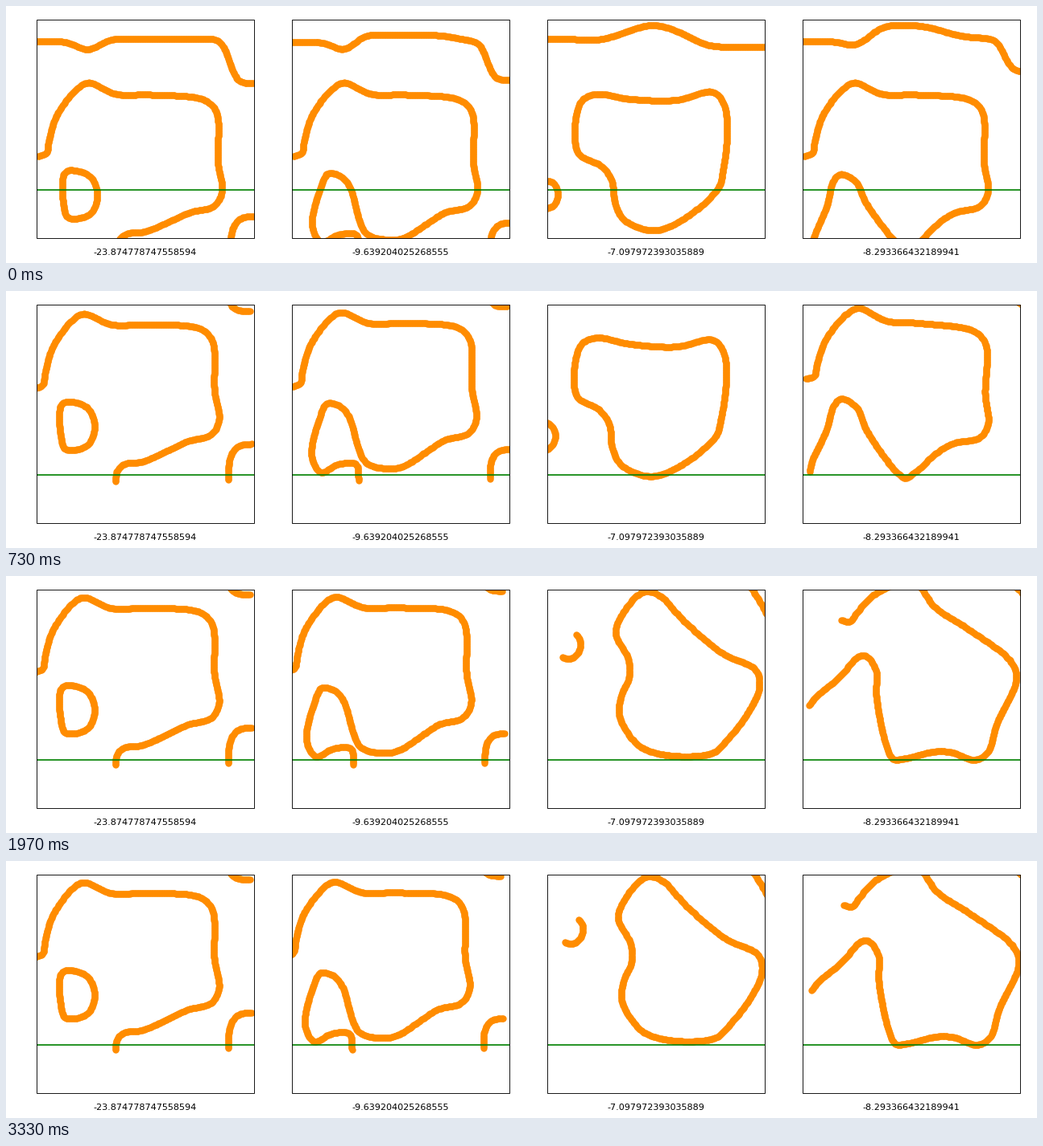
Recreate the animation shown at these times as a matplotlib script. Size 1280 by 320 pixels, loop 3.36 s.

```python
import numpy as np
import matplotlib.pyplot as plt
from matplotlib.animation import FuncAnimation
from matplotlib.patches import Rectangle

W, H, DPI = 1280, 320, 80
LOOP, TICK = 3360, 10          # ms
LEFT, TOP, WIDTH, HEIGHT, PITCH = 38, 17, 270, 272, 317
GROUND = 229
ASPECT = 0.87                  # x scale over y scale inside a panel
PIVOT = np.array([132, 170])


def dots(curve, gap=1.5):
    """Evenly spaced points along a polyline."""
    s = np.append(0, np.cumsum(np.hypot(*np.diff(curve, axis=0).T)))
    at = np.linspace(0, s[-1], int(s[-1] / gap) + 1)
    return np.column_stack([np.interp(at, s, c) for c in curve.T])


def spline(points, closed=False):
    """Smooth curve through a few key points."""
    p = np.array(points, float)
    if closed:
        p = np.vstack([p[-1], p, p[:2]])
    t = np.append(0, np.cumsum(np.hypot(*np.diff(p, axis=0).T) ** 0.5))
    m = np.gradient(p, t, axis=0)
    if closed:
        p, t, m = p[1:-1], t[1:-1], m[1:-1]
    u = np.linspace(0, 1, 30)[:, None]
    parts = []
    for i, h in enumerate(np.diff(t)):
        parts.append((1 + 2 * u) * (1 - u)**2 * p[i] + u * (1 - u)**2 * h * m[i]
                     + u * u * (3 - 2 * u) * p[i + 1]
                     + u * u * (u - 1) * h * m[i + 1])
    return dots(np.vstack(parts))


def wave(base, bumps, steps):
    """Level line with Gaussian bumps and soft steps: (height, centre, width)."""
    x = np.arange(-2, WIDTH + 1, 0.5)
    y = np.full_like(x, base)
    for a, c, w in bumps:
        y += a * np.exp(-((x - c) / w)**2 / 2)
    for a, c, w in steps:
        y += a / (1 + np.exp((c - x) / w))
    return dots(np.column_stack([x, y]))


def arc(cx, cy, rx, ry, start, end, power=1.0):
    a = np.radians(np.linspace(start, end, 90))
    c, s = np.cos(a), np.sin(a)
    return dots(np.column_stack([cx + rx * np.sign(c) * abs(c)**power,
                                 cy + ry * np.sign(s) * abs(s)**power]))


# Shapes in panel pixels; three bodies share one shell and differ below it
shell = [(2, 187), (12, 183), (15, 168), (25, 136), (50, 103), (64, 95.5),
         (98, 109.5), (142, 110.5), (208, 117), (223, 132), (225, 195),
         (230, 231), (220, 249), (190, 257)]
foot = [(170, 266), (134, 281), (112, 283.5), (103, 291), (100, 305)]
leg = [(172, 268), (140, 288), (123, 291), (92, 283), (72, 226), (62, 213),
       (45, 208.5), (36, 225), (25, 273), (36, 294), (58, 284.5), (80, 285),
       (83, 305)]
fork = [(171, 268), (142, 296), (130, 304), (115, 293), (79, 246), (66, 219),
        (47, 209.5), (38, 218), (30, 249), (14, 288), (11, 302)]
window = [(34, 209), (41, 204.5), (66, 212), (75.5, 235), (66, 259),
          (39, 263.5), (33, 245)]
bean = [(65, 109.5), (100, 115.5), (160, 117), (205, 107), (219, 122),
        (223, 160), (218, 205), (212, 227), (166, 267), (131, 279.5),
        (95, 266), (84, 245), (80, 218), (68, 200), (39, 184), (34, 155),
        (40, 122), (49, 113)]


def rise(k, rate):
    """Critically damped push out of the ground, 0 to 1."""
    return 1 - (1 + rate * k) * np.exp(-rate * k)


def slide(k, start, decay):
    return 1 - np.exp(-max(k - start, 0) / decay)


# Each motion gives dx, dy and the clockwise turn in degrees at step k
def settle(k):
    r = rise(k, 0.253)
    return -4.7 * r, -70.3 * r, -1.1 * r


def drift(k):
    r = rise(k, 0.3)
    return (-11 * r * (1 - np.exp((16 - k) / 28)), -71 * r,
            -r * np.tanh((k - 14) / 4))


def roll(k):
    r = rise(k, 0.345)
    turn = r * min(13 * np.exp(0.066 * (k - 34)) - 4, 35)
    return -3 * r + 0.8 * turn + 14 * slide(k, 47, 8), -49 * r, turn


def topple(k):
    r = rise(k, 0.31)
    turn = r * min(11 * np.exp(0.12 * (k - 34)), 28.5)
    lean = turn / 28.5
    return (2.5 * r + 18 * lean**2 + 20 * slide(k, 42, 9),
            -71.5 * r + 12.7 * lean**3, turn)


PANELS = [
    ("-23.874778747558594", settle, [
        wave(44, [(10, 63, 13)], [(-3.5, 85, 6), (56, 239, 4.8)]),
        spline(shell + foot),
        spline(window, closed=True),
        arc(270, 306, 29.5, 44, -90, -180, 2 / 3)]),
    ("-9.639204025268555", drift, [
        wave(45, [(9, 63, 12)], [(-9.5, 82, 6), (9, 205, 12), (48, 242, 4.5)]),
        spline(shell + leg),
        arc(271, 306, 25, 36, -90, -180, 2 / 3)]),
    ("-7.097972393035889", roll, [
        wave(41, [(2, 58, 15), (-17, 131, 29)], [(10, 185, 8)]),
        spline(bean, closed=True),
        arc(0, 234.5, 13, 17, -90, 90)]),
    ("-8.293366432189941", topple, [
        wave(44, [(5, 63, 12)], [(-21, 87, 8), (17, 175, 14), (42, 250, 5)]),
        spline(shell + fork)]),
]


def place(points, dx, dy, turn):
    c, s = np.cos(np.radians(turn)), np.sin(np.radians(turn))
    x, y = (points - PIVOT).T
    return (PIVOT[0] + dx + c * x - ASPECT * s * y,
            PIVOT[1] + dy + s / ASPECT * x + c * y)


fig = plt.figure(figsize=(W / DPI, H / DPI), dpi=DPI, facecolor="white")
ax = fig.add_axes([0, 0, 1, 1])
ax.set_xlim(0, W)
ax.set_ylim(H, 0)
ax.axis("off")

bodies = []
for n, (label, motion, curves) in enumerate(PANELS):
    x0 = LEFT + n * PITCH
    box = Rectangle((x0, TOP), WIDTH, HEIGHT, fill=False, ec="black", lw=0.8,
                    zorder=3)
    ax.add_patch(box)
    ax.plot([x0, x0 + WIDTH], [GROUND] * 2, color="green", lw=1.5, zorder=2,
            solid_capstyle="butt")
    ax.text(x0 + WIDTH / 2, 310, label, fontsize=10, family="DejaVu Sans",
            ha="center", va="baseline")
    dotted, = ax.plot([], [], "o", color="darkorange", ms=6, mew=1.5, zorder=1)
    dotted.set_clip_path(box)
    bodies.append((dotted, x0, np.vstack(curves), motion))


def draw(i):
    k = (i * TICK + 5) * 3 // 100      # 30 steps a second
    for dotted, x0, points, motion in bodies:
        x, y = place(points, *motion(k))
        dotted.set_data(x0 + x, y)
    return [body[0] for body in bodies]


anim = FuncAnimation(fig, draw, frames=LOOP // TICK, interval=TICK,
                     repeat=True, repeat_delay=0, blit=False)
plt.show()
```
